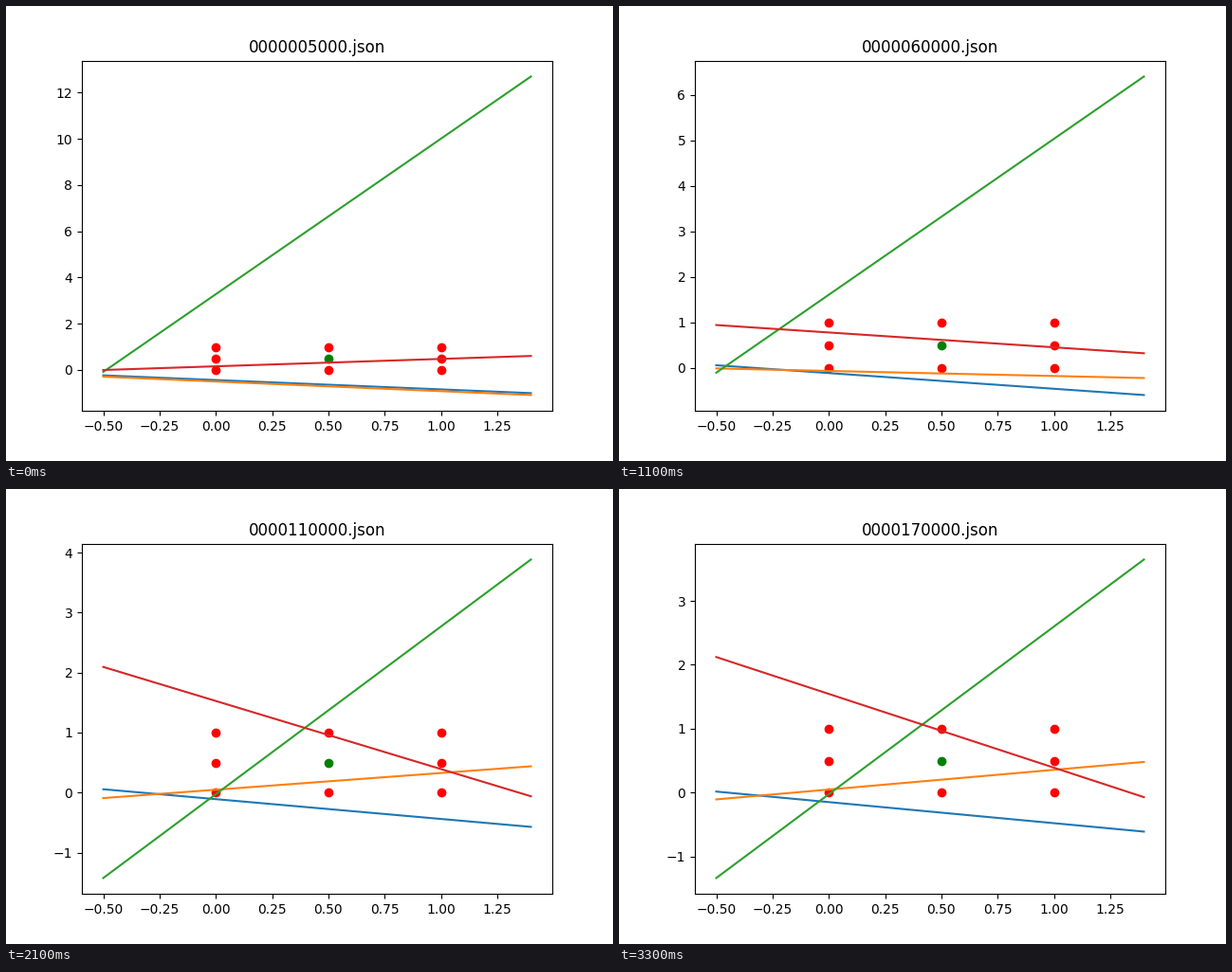
A matplotlib script for the animation above (3.4 s loop, 640 by 480 pixels).

```python
import numpy as np
import matplotlib.pyplot as plt
from matplotlib.animation import FuncAnimation

FRAMES = 34
STEP = 5000
X = np.array([-0.5, 1.4])
MID = X.mean()
t = np.arange(FRAMES)


def rise(center, sharp):
    """S-curve over time from 0 to 1, halfway at center."""
    r = (t / center) ** sharp
    return r / (1 + r)


turn = rise(9.8, 12)    # blue line lifts
snap = rise(14.7, 29)   # late jump of red and green

blue_mid = -0.62 + 0.48 * turn - 0.18 * rise(17, 3)
blue_slope = -0.405 + 0.075 * turn

orange_mid = -0.69 + 0.877 * rise(9.85, 5.5)
orange_slope = -0.418 + 0.73 * rise(11.7, 5.2)

# The green line flattens while its zero crossing slides to the origin
green_slope = 6.73 - 4.13 * rise(8.3, 4.9) + 0.41 * snap * np.exp((15 - t) / 6)
green_zero = -0.487 + 0.497 * rise(13.45, 16)
green_mid = green_slope * (MID - green_zero)

red_mid = 0.3 + 0.725 * rise(11.3, 7.2)
red_slope = -0.45 + 0.77 * np.exp(-t / 6) - 0.708 * snap

motion = [(blue_mid, blue_slope), (orange_mid, orange_slope),
          (green_mid, green_slope), (red_mid, red_slope)]

fig, ax = plt.subplots(figsize=(6.4, 4.8), dpi=100)
for x in (0, 0.5, 1):
    for y in (0, 0.5, 1):
        ax.plot(x, y, "go" if x == y == 0.5 else "ro")
lines = [ax.plot(X, X, color=f"C{k}")[0] for k in range(len(motion))]
title = ax.set_title("")


def draw(i):
    for line, (mid, slope) in zip(lines, motion):
        line.set_data(X, mid[i] + slope[i] * (X - MID))
    title.set_text(f"{STEP * (i + 1):010d}.json")
    ax.relim()
    ax.autoscale_view()
    return [title, *lines]


anim = FuncAnimation(fig, draw, frames=FRAMES, interval=100,
                     init_func=lambda: draw(0), repeat=True, repeat_delay=0)
plt.show()
```
